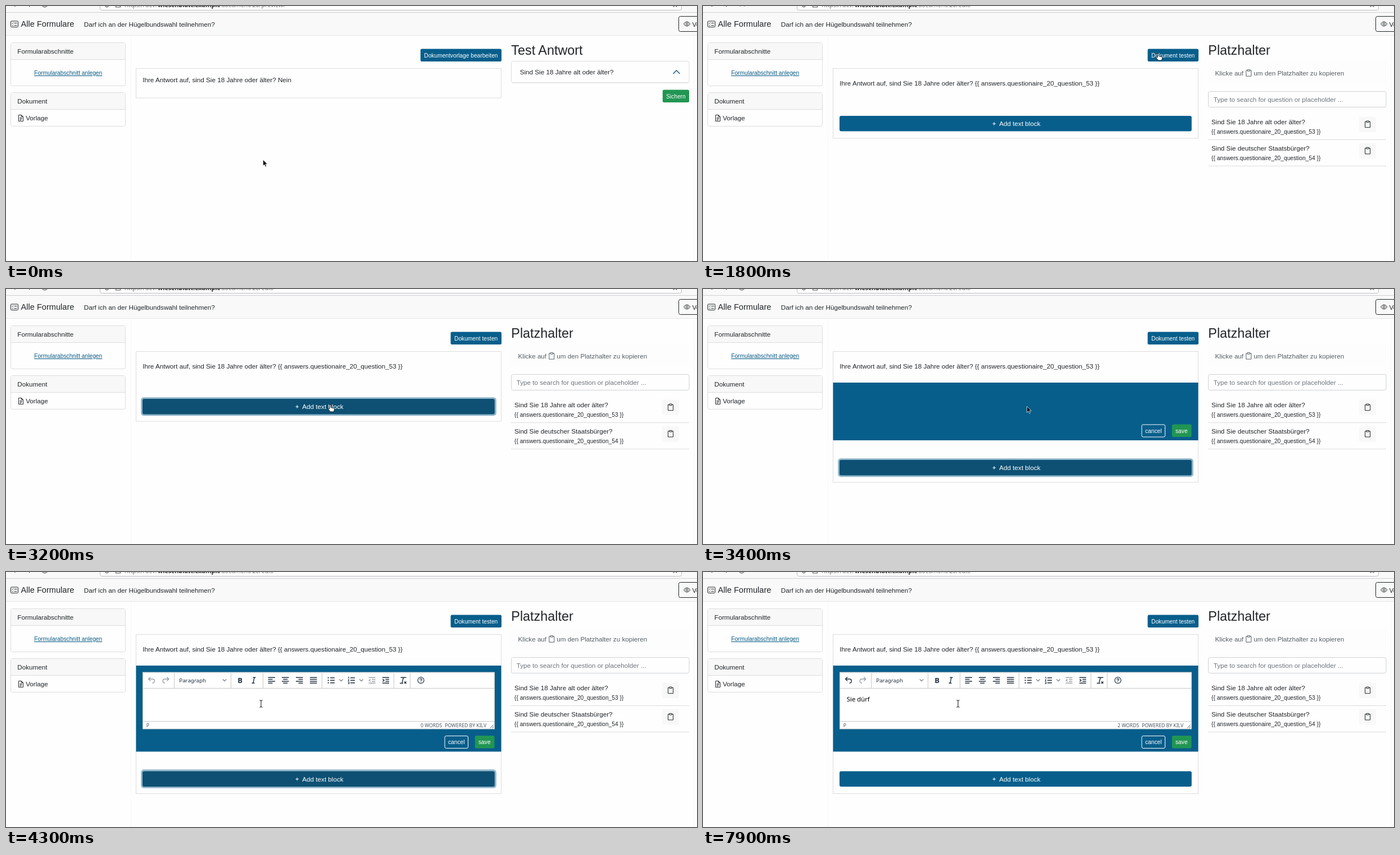
Write an HTML page that moves like this. It is 1230 px wide and 455 px high and loops after 8000 ms.

```html
<!DOCTYPE html>
<html lang="de">
<head>
<meta charset="utf-8">
<title>Formulare</title>
<style>
html, body { margin: 0; width: 100%; height: 100%; overflow: hidden; background: #fefefe; }
svg { display: block; width: 1230px; height: 455px; }
text { font-family: "Liberation Sans", Arial, sans-serif; font-size: 11.68px; fill: #212529; white-space: pre; }
.brand { font-size: 14.6px; }
.head { font-size: 23.36px; }
.small { font-size: 10.22px; }
.white { fill: #fff; }
.link { fill: #0b5c86; text-decoration: underline; }
.hint { fill: #565e64; }
.ghost { fill: #6c757d; }
.noto, .noto text { font-family: "Noto Sans", "Open Sans", sans-serif; }
.url { font-size: 10.7px; fill: #777; }
.status { font-size: 8.65px; fill: #4a5562; }
.typed { font-size: 11.3px; font-weight: 500; fill: #000; }
.card { fill: #fefefe; stroke: #dcdddc; }
.cap { fill: #f7f8f7; }
.blue { fill: #075e8b; }
.green { fill: #219653; }
.rule { stroke: #dcdddc; }
.ink { fill: none; stroke: #212529; }
.tool { fill: none; stroke: #222f3e; stroke-width: 1.45; }
.off { stroke: #9aa1a8; }

/* one shared 8 s clock, holding between keys */
.k { animation: 8s step-end -8ms infinite; }
#view, #viewUrl { animation-name: leave; }
#edit, #editUrl { animation-name: enter; }
#reload { animation-name: reload; }
#stop { animation-name: stop; }
#template { animation-name: template; }
#test { animation-name: test; }
#frame { animation-name: frame; }
#add { animation-name: add; }
#addFill { animation-name: addFill; }
#ring { animation-name: ring; }
#panel { animation-name: panel; }
#panelFill { animation-name: panelFill; }
#actions { animation-name: actions; }
#editor { animation-name: editor; }
#undo { animation-name: undo; }
#c1 { animation-name: c1; }
#c2 { animation-name: c2; }
#c3 { animation-name: c3; }
#c4 { animation-name: c4; }
#c5 { animation-name: c5; }
#c6 { animation-name: c6; }
#n0 { animation-name: n0; }
#n1 { animation-name: n1; }
#n2 { animation-name: n2; }
#caret { animation-name: caret; }
#pointer { animation-name: pointer; }
#arrow { animation-name: arrow; }
#hand { animation-name: hand; }
#beam { animation-name: editor; }

@keyframes leave { 0% { opacity: 1 } 20%, 100% { opacity: 0 } }
@keyframes enter { 0% { opacity: 0 } 20%, 100% { opacity: 1 } }
@keyframes reload { 0% { opacity: 1 } 18.75% { opacity: 0 } 28.75%, 100% { opacity: 1 } }
@keyframes stop { 0% { opacity: 0 } 18.75% { opacity: 1 } 28.75%, 100% { opacity: 0 } }
@keyframes template {
  0% { fill: #075e8b }
  11.25% { fill: #075e8b; animation-timing-function: steps(3) }
  15% { fill: #0a5075 }
  17.5%, 100% { fill: #094b6e }
}
@keyframes test {
  0% { fill: #075e8b }
  22.5% { fill: #075e8b; animation-timing-function: steps(4) }
  27.5% { fill: #0a5075; animation-timing-function: steps(3) }
  31.25%, 100% { fill: #075e8b }
}
@keyframes frame { 0% { height: 124.5px } 41.25% { height: 233.5px } 43.75%, 100% { height: 284px } }
@keyframes add {
  0% { transform: translateY(0) }
  41.25% { transform: translateY(109px) }
  43.75%, 100% { transform: translateY(159.5px) }
}
@keyframes addFill {
  0% { fill: #075e8b }
  31.25% { fill: #075e8b; animation-timing-function: steps(3) }
  35% { fill: #0d5073 }
  53.75% { fill: #0d5073; animation-timing-function: steps(2) }
  56.25%, 100% { fill: #075e8b }
}
@keyframes ring {
  0% { opacity: 0 }
  38.75% { opacity: 1 }
  53.75% { opacity: 1; animation-timing-function: steps(2) }
  56.25%, 100% { opacity: 0 }
}
@keyframes panel { 0% { opacity: 0 } 41.25%, 100% { opacity: 1 } }
@keyframes panelFill { 0% { height: 103px } 43.75%, 100% { height: 153.5px } }
@keyframes actions { 0% { transform: translateY(0) } 43.75%, 100% { transform: translateY(50.5px) } }
@keyframes editor { 0% { opacity: 0 } 43.75%, 100% { opacity: 1 } }
@keyframes undo { 0% { stroke: #9aa1a8 } 66.25%, 100% { stroke: #222f3e } }
@keyframes c1 { 0% { fill-opacity: 0 } 65%, 100% { fill-opacity: 1 } }
@keyframes c2 { 0% { fill-opacity: 0 } 67.5%, 100% { fill-opacity: 1 } }
@keyframes c3 { 0% { fill-opacity: 0 } 68.75%, 100% { fill-opacity: 1 } }
@keyframes c4 { 0% { fill-opacity: 0 } 86.25%, 100% { fill-opacity: 1 } }
@keyframes c5 { 0% { fill-opacity: 0 } 90%, 100% { fill-opacity: 1 } }
@keyframes c6 { 0% { fill-opacity: 0 } 98.75%, 100% { fill-opacity: 1 } }
@keyframes n0 { 0% { opacity: 1 } 76.25%, 100% { opacity: 0 } }
@keyframes n1 { 0% { opacity: 0 } 76.25% { opacity: 1 } 97.5%, 100% { opacity: 0 } }
@keyframes n2 { 0% { opacity: 0 } 97.5%, 100% { opacity: 1 } }
@keyframes caret {
  0% { opacity: 0; transform: translateX(256px) }
  56.25% { opacity: 1; transform: translateX(256px) }
  65% { opacity: 1; transform: translateX(262px) }
  67.5% { opacity: 1; transform: translateX(265px) }
  68.75% { opacity: 1; transform: translateX(271px) }
  70% { opacity: 1; transform: translateX(274px) }
  83.75% { opacity: 0; transform: translateX(274px) }
  86.25% { opacity: 1; transform: translateX(281px) }
  90% { opacity: 1; transform: translateX(292px) }
  97.5%, 100% { opacity: 0; transform: translateX(292px) }
}
@keyframes pointer {
  0% { transform: translate(457px, 274px) }
  6.25% { transform: translate(457px, 274px); animation-timing-function: steps(3) }
  10% { transform: translate(807px, 76px) }
  12.5% { transform: translate(808px, 74px) }
  16.25% { transform: translate(808px, 74px); animation-timing-function: steps(4) }
  21.25% { transform: translate(809px, 87px) }
  27.5% { transform: translate(809px, 87px); animation-timing-function: steps(4) }
  32.5% { transform: translate(590px, 200px); animation-timing-function: steps(2) }
  35% { transform: translate(576px, 209px) }
  43.75% { transform: translate(577px, 217px) }
  45% { transform: translate(577px, 217px); animation-timing-function: steps(7) }
  53.75%, 100% { transform: translate(454px, 235px) }
}
@keyframes arrow {
  0% { opacity: 1 } 12.5% { opacity: 0 } 28.75% { opacity: 1 } 32.5% { opacity: 0 }
  41.25% { opacity: 1 } 43.75%, 100% { opacity: 0 }
}
@keyframes hand {
  0% { opacity: 0 } 12.5% { opacity: 1 } 28.75% { opacity: 0 } 32.5% { opacity: 1 }
  41.25%, 100% { opacity: 0 }
}
</style>
</head>
<body>
<svg viewBox="0 0 1230 455">
  <defs>
    <g id="clip" fill="none" stroke-width="1">
      <path d="M-2.2-4.7H-4.5V5.7H4.5V-4.7H2.2"/>
      <path d="M-2.2-5.9H2.2V-3.4H-2.2Z"/>
    </g>
    <path id="down" d="M-3.3-1.6 0 1.7 3.3-1.6" fill="none" stroke="#6b7480" stroke-width="1.2"/>
  </defs>
  <rect width="1230" height="455" fill="#fefefe"/>

  <!-- browser bar -->
  <rect width="1230" height="11" fill="#f9f9fa"/>
  <rect x="167.5" y="-20" width="1035" height="27.5" rx="3" fill="#fff" stroke="#bcbcc0"/>
  <path d="M0 11.5H1230" stroke="#cfcfd1"/>
  <g fill="none" stroke="#555" stroke-width="1.1">
    <path d="M13-2 16.5 1M41 1 44.5-2"/>
    <path id="reload" class="k" d="M64-1.5A5.4 5.4 0 0 0 74-1.5"/>
    <path id="stop" class="k" d="M66 .6 70-4 74 .6"/>
    <path d="M176-2Q176.500 1 179.500 2 182.500 1 183-2M195.500-4V2H203.500V-4M1187.500 1.500 1191-.800 1194.500 1.500"/>
  </g>
  <g class="noto">
    <text class="url" x="211" y="2">https://dev.</text>
    <text class="url" x="270" y="2" style="font-weight:700;fill:#222">wiesenblatt.example</text>
    <text id="viewUrl" class="url k" x="379" y="2">/document/20/preview/</text>
    <text id="editUrl" class="url k" x="379" y="2">/document/20/edit/</text>
  </g>

  <!-- navigation -->
  <rect y="12" width="1230" height="41" fill="#f8f9f8"/>
  <path d="M0 52.500H1230" stroke="#e6e7e6"/>
  <path d="M222.500 53V455M1224.500 53V455" stroke="#f6f7f6"/>
  <rect class="ink" x="8.500" y="27" width="13" height="10.500" rx="1.200"/>
  <path class="ink" d="M10.500 30.300 11.500 31.200 13 29.500M10.500 34.300 11.500 35.200 13 33.500M14.500 30.500H19.500M14.500 34.500H19.500"/>
  <text class="brand" x="26.500" y="37">Alle Formulare</text>
  <text x="138.800" y="36.500">Darf ich an der Hügelbundswahl teilnehmen?</text>
  <rect x="1197.500" y="18.500" width="50" height="27" rx="3" fill="none" stroke="#212529"/>
  <path class="ink" d="M1206.500 32Q1212 24 1217.800 32 1212 40 1206.500 32Z"/>
  <circle class="ink" cx="1212.200" cy="32" r="1.900"/>
  <text x="1221.500" y="36.500">Vorschau</text>

  <!-- left column -->
  <rect class="card" x="8.500" y="65.500" width="204" height="77" rx="3"/>
  <path class="cap" d="M9 66H212V95H9Z"/>
  <path class="rule" d="M9 95.500H212"/>
  <text x="20.300" y="84.500">Formularabschnitte</text>
  <text class="small link" x="50.200" y="123">Formularabschnitt anlegen</text>
  <rect class="card" x="8.500" y="154.500" width="204" height="60" rx="3"/>
  <path class="cap" d="M9 155H212V184H9Z"/>
  <path class="rule" d="M9 184.500H212"/>
  <text x="20.300" y="174">Dokument</text>
  <path class="ink" d="M22.500 194.500H27.500L30.500 197.500V205.500H22.500ZM27.500 194.500V197.500H30.500M24.500 199.500H28.500M24.500 201.500H28.500M24.500 203.500H27"/>
  <text x="35.200" y="204">Vorlage</text>

  <!-- preview page -->
  <g id="view" class="k">
    <rect id="template" class="blue k" x="737.800" y="76.500" width="144.200" height="22.500" rx="2.500"/>
    <text class="small white" x="744.300" y="91.700">Dokumentvorlage bearbeiten</text>
    <rect class="card" x="231.500" y="111.500" width="650" height="52.500"/>
    <text x="243.200" y="136">Ihre Antwort auf, sind Sie 18 Jahre oder älter? Nein</text>
    <text class="head" x="899.300" y="87">Test Antwort</text>
    <rect class="card" x="899.500" y="98.500" width="316.500" height="38" rx="3"/>
    <path d="M901 137.500H1215" stroke="#ececec"/>
    <text x="914.700" y="122.300">Sind Sie 18 Jahre alt oder älter?</text>
    <path d="M1187.500 121 1193.500 115 1199.500 121" fill="none" stroke="#0b567f" stroke-width="1.300"/>
    <rect class="green" x="1168.800" y="149.500" width="47.200" height="22.500" rx="2.500"/>
    <text class="small white" x="1175" y="164.500">Sichern</text>
  </g>

  <!-- edit page -->
  <g id="edit" class="k">
    <rect id="test" class="blue k" x="791.500" y="76.500" width="90.500" height="22.500" rx="2.500"/>
    <text class="small white" x="798" y="91.700">Dokument testen</text>
    <rect id="frame" class="card k" x="231.500" y="111.500" width="650" height="124.500"/>
    <text x="243.200" y="142">Ihre Antwort auf, sind Sie 18 Jahre oder älter? {{ answers.questionaire_20_question_53 }}</text>

    <g id="add" class="k">
      <rect id="ring" class="k" x="240.200" y="193.200" width="632.600" height="33" rx="5" fill="#90b5c9"/>
      <rect id="addFill" class="blue k" x="243" y="196" width="626.800" height="27.500" rx="3"/>
      <path d="M515.500 210H521M518.200 207.200V212.800" stroke="#fff"/>
      <text class="white" x="527.300" y="214">Add text block</text>
    </g>

    <g id="panel" class="k">
      <rect id="panelFill" class="blue k" x="231.500" y="167" width="650" height="103"/>
      <g id="actions" class="k">
        <rect x="781" y="242" width="41.500" height="22" rx="2.500" fill="none" stroke="#fff"/>
        <text class="small white" x="787" y="256.700">cancel</text>
        <rect class="green" x="834.800" y="241.500" width="34.700" height="22.500" rx="2.500"/>
        <text class="small white" x="841" y="256.700">save</text>
      </g>
    </g>

    <g id="editor" class="k noto">
      <rect x="243.500" y="179" width="626" height="101" fill="#fff" stroke="#ccc"/>
      <path d="M244 207.500H869M244 266.500H869M299.500 180V207M400.500 180V207M457.500 180V207M562.500 180V207M690.500 180V207M719.500 180V207" stroke="#c8c8c8"/>
      <path id="undo" class="tool off k" d="M257.200 187.500 253.700 191 257.200 194.500M254 191H260.500Q264.300 191 264.300 194.500T260.500 198.200"/>
      <path class="tool off" d="M286.300 187.500 289.800 191 286.300 194.500M289.500 191H283Q279.200 191 279.200 194.500T283 198.200"/>
      <text x="308.300" y="197" style="font-size:9.700px;fill:#222f3e">Paragraph</text>
      <use href="#down" x="389" y="193"/>
      <text x="412.200" y="198" style="font-size:13px;font-weight:700;fill:#222f3e">B</text>
      <path class="tool" d="M439.500 188.200H444.500M437.500 198.200H442.500M442 188.200 440 198.200"/>
      <path class="tool" d="M466.500 188.200H479M466.500 191.500H474.500M466.500 194.900H479M466.500 198.200H474.500"/>
      <path class="tool" d="M491 188.200H503.500M493.300 191.500H501.200M491 194.900H503.500M493.300 198.200H501.200"/>
      <path class="tool" d="M516 188.200H528.500M520.500 191.500H528.500M516 194.900H528.500M520.500 198.200H528.500"/>
      <path class="tool" d="M541 188.200H553.500M541 191.500H553.500M541 194.900H553.500M541 198.200H553.500"/>
      <path class="tool" d="M572.500 188.700H575M572.500 193.200H575M572.500 197.700H575M577 188.700H585M577 193.200H585M577 197.700H585"/>
      <use href="#down" x="596.500" y="193"/>
      <path class="tool" d="M613 188.700H621M613 193.200H621M613 197.700H621"/>
      <path class="tool" style="stroke-width:1" d="M609 187.500H610.300V190.500M608.800 192H610.800L609 194.500H611M608.800 196.500H610.800V199.500H608.800M609.500 198H610.800"/>
      <use href="#down" x="632.500" y="193"/>
      <path class="tool off" d="M645.500 188.200H657.500M651 191.500H657.500M651 194.900H657.500M645.500 198.200H657.500M648.800 191 646.300 193.200 648.800 195.400"/>
      <path class="tool" d="M670 188.200H682M675.500 191.500H682M675.500 194.900H682M670 198.200H682M670.500 191 673 193.200 670.500 195.400"/>
      <path class="tool" d="M702.500 188.200H712.500M707.500 188.200 705 197.500M701 198.400H707M709 195.500 712.500 199M712.500 195.500 709 199"/>
      <circle class="tool" style="stroke-width:1.200" cx="738.500" cy="193.200" r="5.500"/>
      <path class="tool" style="stroke-width:1.200" d="M736.700 192Q736.700 190.300 738.500 190.300T740.300 191.900Q740.300 192.800 738.500 193.600V194.600M738.500 195.400V196.600"/>
      <text class="typed" x="255.800" y="231.300"><tspan id="c1" class="k">S</tspan><tspan id="c2" class="k">i</tspan><tspan id="c3" class="k">e</tspan><tspan id="c4" class="k"> d</tspan><tspan id="c5" class="k">ür</tspan><tspan id="c6" class="k">f</tspan></text>
      <rect id="caret" class="k" y="220" width="1" height="15"/>
      <text class="status" x="249.800" y="276.500">P</text>
      <text id="n0" class="status k" x="738" y="276.500">0</text>
      <text id="n1" class="status k" x="738" y="276.500">1</text>
      <text id="n2" class="status k" x="738" y="276.500">2</text>
      <text class="status" x="745.200" y="276.500">WORDS</text>
      <text class="status" x="781.200" y="276.500">POWERED BY KILV</text>
      <path d="M862 278.500 868 272.500M865.500 278.500 868 276" stroke="#4a5562"/>
    </g>

    <!-- placeholder column -->
    <text class="head" x="899.300" y="87">Platzhalter</text>
    <rect x="899" y="98.500" width="317" height="42" rx="3" fill="#fcfdfc"/>
    <text class="hint" x="911.500" y="123.700">Klicke auf</text>
    <use href="#clip" x="971.300" y="119.500" stroke="#565e64"/>
    <text class="hint" x="980.300" y="123.700">um den Platzhalter zu kopieren</text>
    <rect class="card" style="stroke:#ced2d5" x="899.500" y="152.500" width="316.500" height="28" rx="3"/>
    <text class="ghost" x="908.700" y="170.500">Type to search for question or placeholder ...</text>
    <text x="905" y="210.500">Sind Sie 18 Jahre alt oder älter?</text>
    <text class="small" x="905" y="228">{{ answers.questionaire_20_question_53 }}</text>
    <text x="905" y="257.800">Sind Sie deutscher Staatsbürger?</text>
    <text class="small" x="905" y="275.300">{{ answers.questionaire_20_question_54 }}</text>
    <path class="rule" d="M899 238.500H1216M899 285.500H1216"/>
    <rect class="cap" x="1168" y="197.500" width="30" height="27.500" rx="3"/>
    <rect class="cap" x="1168" y="244.700" width="30" height="27.500" rx="3"/>
    <use href="#clip" x="1183" y="211" stroke="#212529"/>
    <use href="#clip" x="1183" y="258.300" stroke="#212529"/>
  </g>

  <g id="pointer" class="k">
    <path id="arrow" class="k" d="M.5 .3V11.300L3 9 4.800 13 6.700 12.200 4.900 8.300H8.500Z" fill="#111" stroke="#fff" stroke-width=".7"/>
    <path id="hand" class="k" d="M0-2Q1.200-3.200 2.300-2V2.500L7.500 3.800Q8.800 4.300 8.600 6L7.500 10H1.500L-2.300 5.500Q-2.500 4-1 4.300L0 5Z" fill="#fff" stroke="#111" stroke-width=".9"/>
    <path id="beam" class="k" d="M-2.700-6.200Q0-6.200 0-4.800 0-6.200 2.700-6.200M0-5V5M-2.700 6.200Q0 6.200 0 4.800 0 6.200 2.700 6.200" fill="none" stroke="#222" stroke-width="1.100"/>
  </g>
</svg>
</body>
</html>
```
